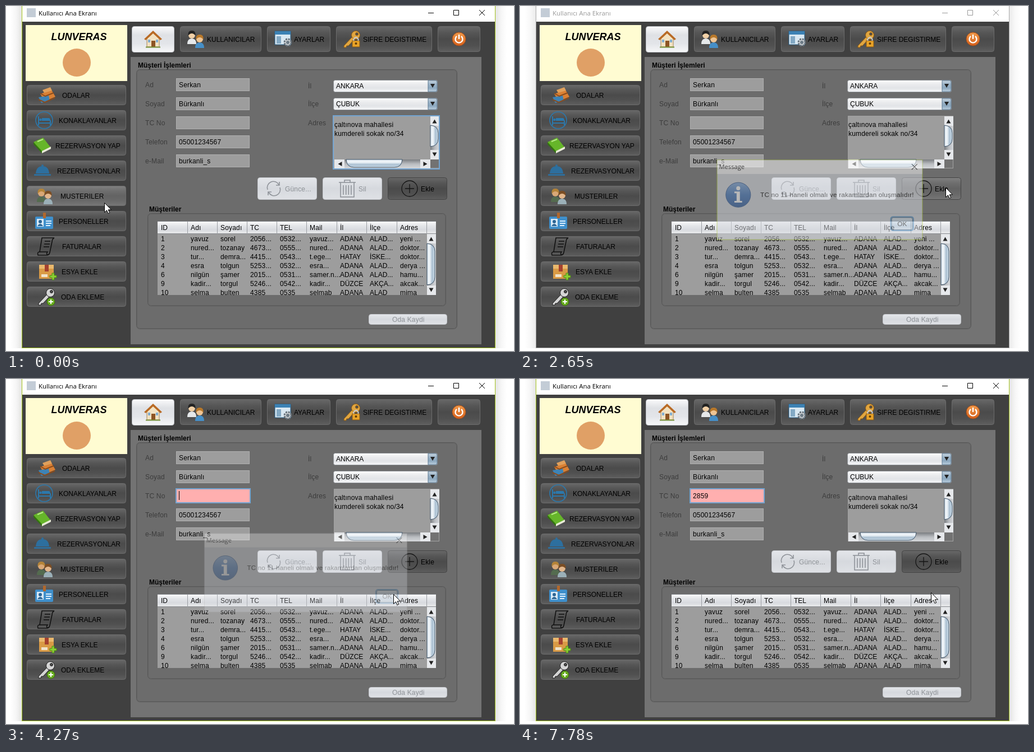
An HTML page for the animation above (8 s loop, 905x616 px).

```html
<!DOCTYPE html>
<html lang="tr">
<head>
<meta charset="utf-8">
<title>Kullanıcı Ana Ekranı</title>
<style>
html, body { margin: 0; width: 100%; height: 100%; overflow: hidden; background: #fff; }
svg { display: block; width: 100vw; height: 100vh; }
text { font: 12px "Liberation Sans", Arial, sans-serif; white-space: pre; }
.mixed { letter-spacing: .17px; }
.b { font-weight: bold; }
.ui { font: 11.4px "Open Sans", "Noto Sans", sans-serif; }
</style>
</head>
<body>
<svg id="stage" viewBox="0 0 905 616" preserveAspectRatio="none" xmlns="http://www.w3.org/2000/svg"></svg>
<script>
const LIME = '#a4c41c', FIELD = '#9d9d9d';

// Lower case and digits are set slightly looser than capitals
const text = (x, y, s, fill = '#000', extra = '') =>
  `<text x="${x}" y="${y}" fill="${fill}" ${extra || (/[\p{Ll}\d]/u.test(s) ? 'class="mixed"' : '')}>${s}</text>`;
const rect = (x, y, w, h, fill, extra = '') => `<rect x="${x}" y="${y}" width="${w}" height="${h}" fill="${fill}" ${extra}/>`;
const path = (d, fill = 'none', extra = '') => `<path d="${d}" fill="${fill}" ${extra}/>`;
const circle = (x, y, r, fill, extra = '') => `<circle cx="${x}" cy="${y}" r="${r}" fill="${fill}" ${extra}/>`;
const line = (d, color, w = 1) => path(d, 'none', `stroke="${color}" stroke-width="${w}"`);
const at = (x, y, body) => `<g transform="translate(${x} ${y})">${body}</g>`;
const gradient = (id, colors, dir = 'x2="0" y2="1"') => `<linearGradient id="${id}" ${dir}>` +
  colors.map((c, i) => `<stop offset="${i / (colors.length - 1)}" stop-color="${c}"/>`).join('') + '</linearGradient>';

const darkButton = (x, y, w, h, id = '') =>
  rect(x + .5, y + .5, w - 1, h - 1, 'url(#dark)', `rx="4" stroke="#6c6c6c" ${id && `id="${id}"`}`);
const lightButton = (x, y, w, h) => rect(x + .5, y + .5, w - 1, h - 1, 'url(#light)', 'rx="4" stroke="#c3c6cb"');
const triangle = (x, y, turn) => `<path d="M-4 -3.5H4L0 3.5Z" fill="#222" transform="translate(${x} ${y}) rotate(${turn})"/>`;

// Vertical scroll bar, 16 wide
const scrollV = (x, y, h, thumbY, thumbH) =>
  rect(x, y, 16, h, 'url(#track)') +
  rect(x, y, 16, 17, '#e6e8eb') + triangle(x + 7.5, y + 9, 180) +
  rect(x, y + h - 17, 16, 17, '#e6e8eb') + triangle(x + 7.5, y + h - 9, 0) +
  path(`M${x} ${thumbY}q14 1 14 14v${thumbH - 28}q0 13 -14 14z`, 'url(#thumbV)', 'stroke="#3d5266"');
const scrollH = (x, y, w, thumbX, thumbW) =>
  rect(x, y, w, 16, 'url(#trackH)') +
  rect(x, y, 18, 16, '#e6e8eb') + triangle(x + 10, y + 8, 90) +
  rect(x + w - 18, y, 18, 16, '#e6e8eb') + triangle(x + w - 9, y + 8, -90) +
  path(`M${thumbX} ${y}q1 14 14 14h${thumbW - 28}q13 0 14 -14z`, 'url(#thumbH)', 'stroke="#3d5266"');

const person = (skin, hair, coat) =>
  path('M-8 14q0 -10 8 -10t8 10z', coat) + circle(0, -2, 6, skin) + path('M-6.5 -1q-1 -9 6.5 -9t6.5 9q-3 -4 -6.5 -4t-6.5 4z', hair);
const plus = (x, y) => path(`M${x - 2} ${y - 6}h4v4h4v4h-4v4h-4v-4h-4v-4h4z`, '#8ccf35', 'stroke="#4b8a10"');
const key = (color, edge) =>
  path('M-14 12L2 -5L6 -1L-6 12H-9L-10 15H-14Z', color, `stroke="${edge}"`) +
  circle(7, -7, 7.5, color, `stroke="${edge}"`) + circle(9, -9, 2.5, '#4d4d4d', `stroke="${edge}"`);

const icons = {
  bed: path('M-12 -2L8 -9L15 3L-4 11Z', '#d98034') + path('M-15 4L3 1L5 10L-10 14Z', '#3e83b5') +
    path('M-8 -9L6 -14L9 -8L-5 -4Z', '#e0a05c') + line('M-15 8L-4 13L14 5M-12 -3L-3 2L12 -4', '#8a4b1c', 2),
  stay: circle(0, 0, 15, 'none', 'stroke="#2c78ab" stroke-width="1.6"') +
    line('M-10 -7V9M-10 5H11V9M11 5V0', '#2c78ab', 2) + path('M-4 -4h12q3 0 3 5h-15z', '#2c78ab') + circle(-6.5, -1, 2.3, '#2c78ab'),
  book: path('M-15 -6L2 -14L16 4L0 13Z', '#66b52a') + path('M-15 -6L0 10V14L-15 -2Z', '#347410') +
    path('M0 10L16 2V6L0 14Z', '#e9ead8') + line('M-8 -7L2 -11', '#b9e98a', 2),
  cloche: path('M-12 5q1 -13 12 -13t12 13z', '#2d6f9e') + circle(0, -9, 2, '#2d6f9e') + rect(-15, 6, 30, 3, '#2d6f9e', 'rx="1"'),
  guests: at(-6, -3, person('#d9a877', '#b48438', '#546b4f')) + at(6, 1, person('#e3b78c', '#7b4e24', '#9bb0b8')),
  badge: rect(-16, -8, 32, 22, '#3f8fcb', 'rx="2"') + rect(-2, -15, 5, 10, '#b1682d') + rect(-13, -4, 12, 14, '#d9e9f5') +
    circle(-7, 1, 3, '#2b6595') + path('M-12 9q5 -8 10 0z', '#2b6595') + line('M3 0H13M3 4H13M3 8H11', '#dcefff', 2),
  scroll: path('M-7 -15H15q-4 2 -4 7L7 11q-1 5 -6 5H-14q-2 -6 3 -6Z', 'none', 'stroke="#111" stroke-width="1.6"') +
    line('M-11 10H3q-3 4 0 5M-2 -9H8M-3 -4H7M-4 1H6', '#111', 1.5),
  box: path('M-14 -12H12V13H-14Z', '#d99a45') + rect(-14, -12, 26, 7, '#eab96d') + rect(-4, -12, 7, 12, '#a5412f') + rect(-10, 5, 11, 5, '#f0e3cb') + plus(11, 9),
  addKey: key('#d5d5d5', '#1c1c1c') + circle(8, 9, 7, '#69ad20', 'stroke="#376b09"') + line('M8 5V13M4 9H12', '#fff', 2),
  home: path('M-11 -1V14H11V-1L0 -11Z', '#f2e2c2', 'stroke="#a78354"') + path('M-16 0L0 -15L16 0L13 2L0 -10L-13 2Z', '#b96a24') +
    rect(-3, 3, 7, 11, '#8d5424') + rect(5, 1, 4, 5, '#81add0') + rect(-9, 1, 4, 5, '#81add0') + line('M-13 14.5H13', '#77923b', 2),
  users: at(-7, -5, person('#f1d0a6', '#222', '#e5e8ea')) + at(7, 2, person('#efc594', '#b8782a', '#468fc7')),
  window: rect(-15, -14, 28, 24, '#d9e8f2', 'stroke="#225a83"') + rect(-15, -14, 28, 6, '#3c82b5') + rect(-12, -5, 8, 13, '#83a9c4') +
    circle(8, 6, 6, '#cfd3d6', 'stroke="#65717b" stroke-width="3" stroke-dasharray="3 1.7"') + circle(8, 6, 3, '#6d7b86'),
  lockKey: key('#e1a640', '#8d5a12') + rect(1, 3, 13, 11, '#e9a328', 'stroke="#8d5a12"') + path('M3.5 3v-3q4 -6 8 0v3', 'none', 'stroke="#c9ccd0" stroke-width="2"') + circle(7.5, 8, 2, '#623c06'),
  power: circle(0, 0, 12, 'url(#orange)', 'stroke="#a74c15"') + path('M-4 -5a6.5 6.5 0 1 0 8 0M0 -8V0', 'none', 'stroke="#fff" stroke-width="2.4"'),
  refresh: path('M-11 2A11 11 0 0 1 9 -7M11 -2A11 11 0 0 1 -9 7M10 -12V-6H4M-10 12V6H-4', 'none', 'stroke="#8f9399" stroke-width="1.6"'),
  trash: path('M-15 -11H15M-5 -11V-15H5V-11M-12 -11V15H12V-11M-7 -6V11M-2.3 -6V11M2.3 -6V11M7 -6V11', 'none', 'stroke="#8b8f95" stroke-width="1.5"'),
  add: circle(0, 0, 14, 'none', 'stroke="#151515" stroke-width="1.3"') + line('M-8 0H8M0 -8V8', '#151515', 1.3)
};

const nav = [
  ['ODALAR', 100, 'bed', 73], ['KONAKLAYANLAR', 94, 'stay', 68], ['REZERVASYON YAP', 88, 'book', 64],
  ['REZERVASYONLAR', 91, 'cloche', 65], ['MUSTERILER', 97, 'guests', 69], ['PERSONELLER', 94, 'badge', 68],
  ['FATURALAR', 100, 'scroll', 71], ['ESYA EKLE', 99, 'box', 73], ['ODA EKLEME', 98, 'addKey', 72]
];
const tools = [
  [310, 145, 'KULLANICILAR', 358, 'users', 338], [465, 113, 'AYARLAR', 513, 'window', 494],
  [588, 171, 'SIFRE DEGISTIRME', 636, 'lockKey', 616], [769, 76, '', 0, 'power', 807]
];
const fields = [['Ad', 'Serkan'], ['Soyad', 'Bürkanlı'], ['TC No', ''], ['Telefon', '05001234567'], ['e-Mail', 'burkanli_s']];
const columns = [270, 323, 376, 429, 482, 535, 589, 642, 696, 749];
const heads = ['ID', 'Adı', 'Soyadı', 'TC', 'TEL', 'Mail', 'İl', 'İlçe', 'Adres'];
const rows = [
  '1|yavuz|sorel|2056...|0532...|yavuz...|ADANA|ALAD...|yeni ...',
  '2|nured...|tozanay|4673...|0555...|nured...|ADANA|ALAD...|doktor...',
  '3|tur...|demra...|4415...|0543...|t.ege...|HATAY|İSKE...|doktor...',
  '4|esra|tolgun|5253...|0532...|esra...|ADANA|ALAD...|derya ...',
  '6|nilgün|şamer|2015...|0531...|samer.n...|ADANA|ALAD...|hamu...',
  '9|kadir...|torgul|5246...|0542...|kadir...|DÜZCE|AKÇA...|akcak...',
  '10|selma|bulten|4385|0535|selmab|ADANA|ALAD|mima'
].map(r => r.split('|'));

const combo = (y, s) => rect(583.5, y + .5, 185, 21, 'url(#combo)', 'rx="3" stroke="#8d9196"') +
  path(`M752 ${y + 1}h13q3 0 3 3v14q0 3 -3 3h-13z`, 'url(#arrow)', 'stroke="#5d7890"') + triangle(760, y + 10.5, 0) + text(588, y + 15, s);
const panel = (x, y, w, h) => rect(x + .5, y + .5, w - 1, h - 1, '#6c6c6c', 'rx="6" stroke="#575757"') +
  rect(x + 1.5, y + 1.5, w - 3, h - 3, 'none', 'rx="5" stroke="#646464"');

const defs = '<defs>' +
  gradient('dark', ['#686868', '#565656', '#4b4b4b', '#505050', '#5e5e5e']) +
  gradient('hover', ['#808080', '#6e6e6e', '#636363', '#696969', '#777']) +
  gradient('light', ['#e4e6ea', '#d6d9de', '#dfe1e5']) +
  gradient('home', ['#fafafb', '#dfe1e5', '#e3e5e9', '#f6f7f8']) +
  gradient('combo', ['#fdfdfd', '#ebecee', '#e2e4e7', '#f7f8f9']) +
  gradient('arrow', ['#c7d5e1', '#9bb3c7', '#8ca8bf', '#bdd0df']) +
  gradient('head', ['#f9f9fa', '#e4e6e9', '#d8dadf', '#eceded']) +
  gradient('track', ['#7a7d81', '#b9bcc0', '#d5d7da'], 'x2="1" y2="0"') +
  gradient('trackH', ['#7a7d81', '#b9bcc0', '#d5d7da']) +
  gradient('thumbV', ['#dce6ee', '#f1f6fa', '#a9bfd1', '#cfdee9'], 'x2="1" y2="0"') +
  gradient('thumbH', ['#dce6ee', '#f1f6fa', '#a9bfd1', '#cfdee9']) +
  gradient('orange', ['#f09a4b', '#d5601c']) +
  gradient('info', ['#7fa9dc', '#3f75bd', '#2a5a9f']) +
  gradient('ok', ['#eef4f9', '#c0d2e2', '#b0c6d9', '#d8e6f0']) +
  gradient('pressed', ['#3f5f7d', '#5b7d9c', '#7295b2']) +
  gradient('shadeR', ['#e4e4e4', '#f6f6f6', '#fff'], 'x2="1" y2="0"') +
  gradient('shadeL', ['#fff', '#f6f6f6', '#e4e4e4'], 'x2="1" y2="0"') +
  '<clipPath id="body"><rect x="270" y="407" width="480" height="109"/></clipPath></defs>';

const frame =
  `<g id="shadow">${rect(8, 0, 20, 611, 'url(#shadeL)')}${rect(872, 0, 20, 611, 'url(#shadeR)')}</g>` +
  rect(28.5, -.5, 843, 611, '#fff', `id="border" stroke="${LIME}"`) +
  rect(37, 4, 16, 16, '#c3ccd6') +
  `<g id="caption">${text(58, 17, 'Kullanıcı Ana Ekranı', 'currentColor', 'class="ui"')}` +
  line('M752 12.5H762M797.5 7.5H806.5V16.5H797.5ZM843 7L853 17M853 7L843 17', 'currentColor') + '</g>' +
  rect(29, 28, 842, 582, '#404040') + rect(222, 91, 625, 513, '#737373');

const sidebar =
  rect(35, 34, 181, 100, '#fffcd2') + text(130, 61, 'LUNVERAS', '#000', 'text-anchor="middle" style="font:italic bold 18px \'Liberation Sans\',sans-serif"') +
  circle(126, 101, 25, '#e0a066') +
  nav.map(([s, x, icon, ix], i) => darkButton(37, 141 + 45 * i, 177, 36, 'nav' + i) +
    at(ix, 159 + 45 * i, icons[icon]) + text(x, 164 + 45 * i, s)).join('');

const toolbar =
  rect(224.5, 36.5, 75, 46, 'url(#home)', 'rx="4" stroke="#b9bcc1"') + at(262, 59, icons.home) +
  tools.map(([x, w, s, tx, icon, ix]) => darkButton(x, 36, w, 46) + at(ix, 59, icons[icon]) + text(tx, 64, s)).join('');

const form = text(235, 110, 'Müşteri İşlemleri', '#000', 'class="b"') + panel(232, 113, 572, 464) +
  fields.map(([label, value], i) => {
    const y = 129 + 34 * i;
    return text(248, y + 16, label, '#3c3c3c') + rect(303.5, y + .5, 130, 22, FIELD, 'stroke="#b0b0b0"') + text(308, y + 16, value);
  }).join('') +
  `<g id="tc">${rect(303, 196, 132, 25, '#ffafaf', 'stroke="#73a4d1" stroke-width="2"')}${text(308, 213, '', '#000', 'id="tcText" class="mixed"')}</g>` +
  text(538, 147, 'İl', '#3c3c3c') + text(538, 179, 'İlçe', '#3c3c3c') + text(538, 213, 'Adres', '#3c3c3c') +
  combo(132, 'ANKARA') + combo(164, 'ÇUBUK') +
  rect(584.5, 196.5, 187, 93, '#727272', 'stroke="#a2a2a2"') + rect(585, 197, 171, 77, FIELD) +
  text(585, 216, 'çaltınova mahallesi') + text(585, 232, 'kumdereli sokak no/34') +
  scrollV(756, 197, 77, 213, 38) + scrollH(585, 274, 171, 606, 100) +
  rect(583, 196, 189, 95, 'none', 'id="ring" stroke="#73a4d1" stroke-width="2"') +
  lightButton(448, 306, 106, 40) + at(477, 326, icons.refresh) + text(497, 331, 'Günce...', '#8e9297') +
  lightButton(564, 306, 106, 40) + at(608, 326, icons.trash) + text(628, 331, 'Sil', '#8e9297') +
  darkButton(680, 306, 106, 40, 'add') + at(719, 326, icons.add) + text(739, 331, 'Ekle');

const table = text(255, 367, 'Müşteriler', '#000', 'class="b"') + panel(252, 370, 532, 166) +
  rect(270, 385, 496, 131, FIELD) + rect(270, 385, 496, 22, 'url(#head)') + line('M270 406.5H766M270 384.5H766', '#85888d') +
  columns.slice(1).map(x => line(`M${x + .5} 385V407`, '#9a9da2')).join('') +
  heads.map((s, i) => text(columns[i] + 6, 400, s)).join('') +
  `<g clip-path="url(#body)">${rows.map((r, j) => r.map((s, i) => text(columns[i] + 6, 420 + 16 * j, s)).join('')).join('')}</g>` +
  scrollV(750, 407, 109, 424, 74) +
  lightButton(646, 550, 140, 19) + text(688, 564, 'Oda Kaydi', '#8e9297');

const dialog = '<g id="dialog">' + rect(347.5, 273.5, 373, 145, '#d6d9df', `id="dialogBorder" stroke="${LIME}"`) + rect(348, 274, 372, 25, '#fff') +
  text(351, 290, 'Message', '#000', 'class="ui"') + line('M701 281L711 291M711 281L701 291', '#000', 1.1) +
  circle(386, 337, 22.5, 'url(#info)', 'stroke="#2c5590"') +
  path('M379 331H389V348H393V351H379V348H383V334H379Z', '#fff') + circle(386, 325, 3.6, '#fff') +
  text(426, 341, 'TC no 11 haneli olmalı ve rakamlardan oluşmalıdır!') +
  rect(663, 377, 41, 25, 'url(#ok)', 'id="ok" rx="4" stroke="#4f8fc4" stroke-width="2"') + rect(664.5, 378.5, 38, 22, 'none', 'rx="3" stroke="#33536f"') +
  text(675, 394, 'OK') + '</g>';

const stage = document.getElementById('stage');
stage.innerHTML = defs + frame + sidebar + toolbar + form + table + rect(585, 219, 1, 16, '#000', 'id="caret"') + dialog +
  path('M0 0V17L4 13.2L6.6 19L9.2 17.8L6.7 12.3H12Z', '#fff', 'id="cursor" stroke="#000" stroke-width="1"');
const $ = id => document.getElementById(id);

// start, end, steps, x, y reached
const moves = [
  [610, 1400, 11, 772, 315], [1470, 1780, 5, 758, 324], [2810, 3270, 7, 694, 384],
  [3350, 3350, 1, 692, 384], [3660, 3660, 1, 690, 384], [4590, 4740, 3, 732, 381]
];
// time, opacity, scale
const fades = [[0, 0, .94], [2580, .2, .96], [2650, .52, .981], [2730, .84, .993], [2810, 1, 1],
  [4130, .8, .988], [4200, .55, .978], [4270, .3, .968], [4350, .1, .96], [4430, 0, .95]];
// time, typed digits, caret shown
const typing = [[4130, 0, 1], [4740, 0, 0], [5200, 0, 1], [5610, 1, 1], [6070, 1, 0], [6540, 2, 1], [6930, 3, 1], [7310, 4, 1], [7780, 4, 0]];
const blinks = [[0, 0], [140, 1], [610, 0], [1160, 1], [1630, 0], [2180, 1], [2500, 0]];

const current = (steps, t) => steps.filter(s => s[0] <= t).pop();

function cursorAt(t) {
  let x = 175, y = 351;
  for (const [start, end, n, toX, toY] of moves) {
    if (t < start) break;
    const step = n > 1 ? Math.floor((t - start) / ((end - start) / (n - 1)) + .01) + 1 : 1;
    const p = Math.min(step / n, 1), e = p * p * (3 - 2 * p);
    x += (toX - x) * e;
    y += (toY - y) * e;
  }
  return [Math.round(x), Math.round(y)];
}

function render(t) {
  const active = t < 2500 || t >= 4130, entering = t >= 4130;
  const [x, y] = cursorAt(t);
  const [, opacity, scale] = current(fades, t);
  const [, digits, typedCaret] = current(typing, t) || [0, 0, 0];
  const shown = entering ? typedCaret : current(blinks, t)[1];
  const inside = (l, top, r, b) => x >= l && x < r && y >= top && y < b;
  const overAdd = inside(680, 306, 786, 346);

  $('cursor').setAttribute('transform', `translate(${x + .5} ${y + .5})`);
  $('dialog').setAttribute('opacity', opacity);
  $('dialog').setAttribute('transform', `translate(534 346) scale(${scale}) translate(-534 -346)`);
  $('dialogBorder').setAttribute('stroke', entering ? '#aaa' : LIME);
  $('ok').setAttribute('fill', entering ? 'url(#pressed)' : 'url(#ok)');
  $('border').setAttribute('stroke', active ? LIME : '#aaa');
  $('caption').style.color = active ? '#000' : '#999';
  $('shadow').setAttribute('opacity', active ? 1 : .75);
  $('ring').setAttribute('opacity', t < 2500 ? 1 : 0);
  $('tc').setAttribute('opacity', entering ? 1 : 0);
  $('tcText').textContent = '2859'.slice(0, digits);
  $('caret').setAttribute('x', entering ? 308 + 7 * digits : 585);
  $('caret').setAttribute('y', entering ? 200 : 219);
  $('caret').setAttribute('opacity', shown);
  $('nav4').setAttribute('fill', inside(37, 321, 214, 357) ? 'url(#hover)' : 'url(#dark)');
  // The button stays lit while the dialog holds the input
  $('add').setAttribute('fill', overAdd || !active ? 'url(#hover)' : 'url(#dark)');
  $('add').setAttribute('stroke', overAdd && active ? '#222' : '#444');
}

const begin = performance.now();
function tick() {
  render((performance.now() - begin) % 8000);
  requestAnimationFrame(tick);
}
tick();
</script>
</body>
</html>
```
